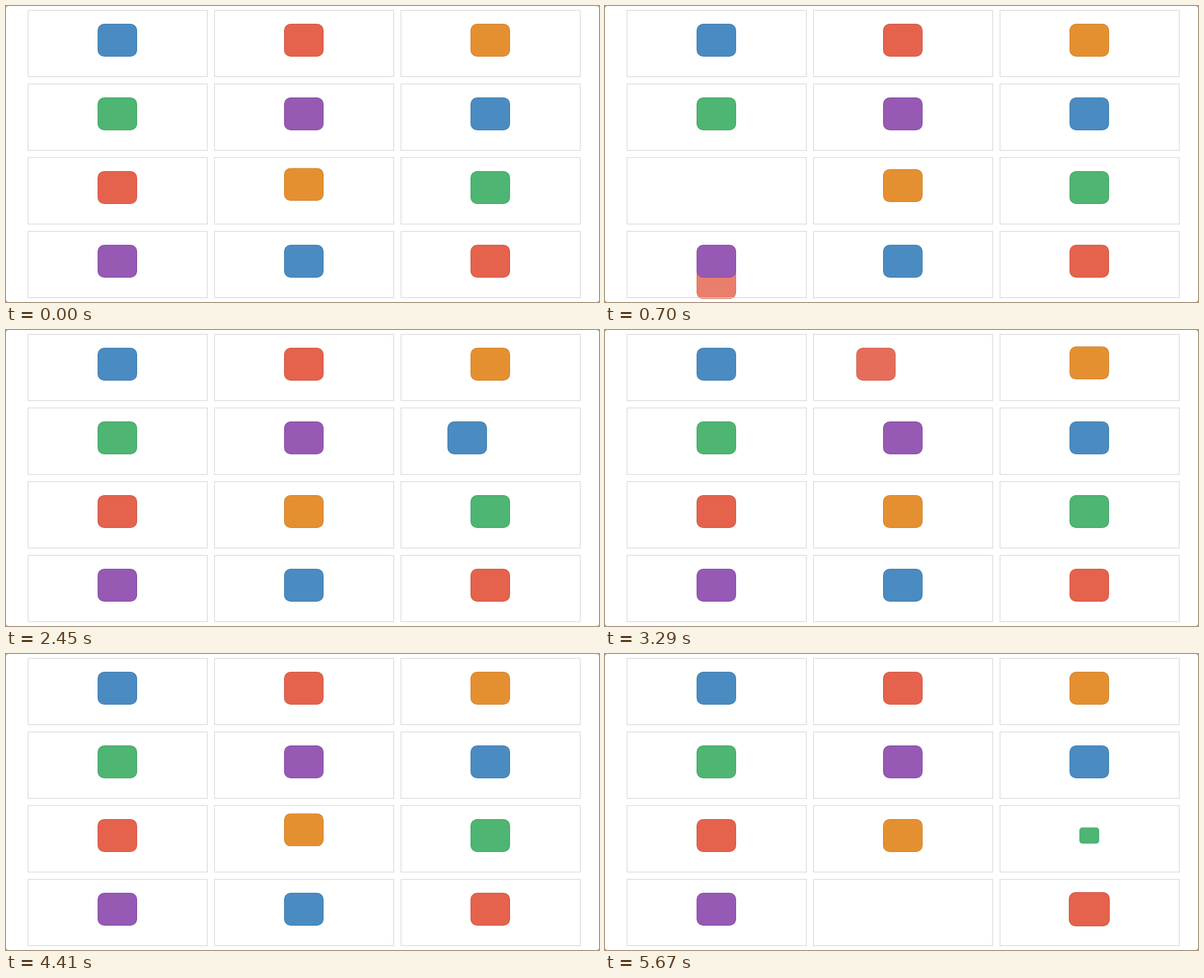
Animation of 900x450 px, one loop 5740 ms. Source, as an HTML page:

```html
<!DOCTYPE html>
<html lang="en">
<head>
<meta charset="utf-8">
<title>Box effects</title>
<style>
  html, body { margin: 0; width: 100%; height: 100%; overflow: hidden; background: #555; }
  #stage { position: relative; width: 900px; height: 450px; overflow: hidden; background: #fff; border-radius: 3px; }
  .cell, .box { position: absolute; box-sizing: border-box; }
  .cell { width: 273px; height: 102px; border: 1px solid #d6d6d6; }
  .box { width: 60px; height: 50px; border: 1px solid rgba(0, 0, 0, .1); border-radius: 10px; }
</style>
</head>
<body>
<div id="stage"></div>
<script>
const LOOP = 5740, STEP = 70;
const colors = ['#4a8bc1', '#e5624d', '#e59030', '#4eb572', '#9659b4'];
const stage = document.getElementById('stage');

function add(cls, left, top) {
  const el = document.createElement('div');
  el.className = cls;
  el.style.left = left + 'px';
  el.style.top = top + 'px';
  return stage.appendChild(el);
}

const boxes = Array.from({ length: 12 }, (_, i) => {
  const x = 33 + (i % 3) * 283, y = 6 + Math.floor(i / 3) * 112;
  add('cell', x, y);
  const box = add('box', x + 106, y + 21);
  box.style.background = colors[i % 5];
  return box;
});

const clamp = v => Math.min(1, Math.max(0, v));
const smooth = v => (v = clamp(v)) * v * (3 - 2 * v);

// Rise to 1, pause briefly, ease back to 0
function pulse(u) {
  return u < 427 ? smooth(u / 400) : clamp((940 - u) / 513) ** 2;
}

// Leave on one side, return from the other with a small overshoot
const fly = (dx, dy) => u => {
  const dist = Math.hypot(dx, dy);
  let k, o = 1;
  if (u < 400) {
    k = (u / 400) ** 2;
    o = 1 - k;
  } else if (u < 750) {
    const rest = (1 - (u - 400) / 350) ** 3;
    k = -rest;
    o = 1 - rest;
  } else {
    const v = (u - 750) / 60;
    k = 3 * v * Math.exp(1 - v) / dist;
  }
  return { x: dx * k, y: dy * k, o };
};

const nudge = (dx, dy) => u => ({ x: dx * pulse(u), y: dy * pulse(u) });
const grow = u => ({ s: 1 + .45 * pulse(u * 1.5) });
const shrink = u => ({ s: 1 - smooth(u / 400) });
const puff = u => {
  const k = clamp(u / 500);
  return { s: 1 + k, o: 1 - k };
};

// [box index, start ms, effect]
const cues = [
  [7, -92, nudge(0, -35)],
  [6, 530, fly(0, 800)],
  [4, 1217, fly(560, 0)],
  [5, 2040, nudge(-35, 0)],
  [2, 2470, nudge(0, -35)],
  [1, 3182, fly(-560, 0)],
  [7, 4280, nudge(0, -35)],
  [10, 4700, puff],
  [11, 5145, grow],
  [8, 5470, shrink]
];

function draw(t) {
  const poses = boxes.map(() => ({}));
  for (const [i, start, effect] of cues) {
    if (t >= start) poses[i] = effect(t - start);
  }
  poses.forEach(({ x = 0, y = 0, s = 1, o = 1 }, i) => {
    const { style } = boxes[i];
    style.transform = `translate(${x.toFixed(2)}px, ${y.toFixed(2)}px) scale(${s.toFixed(3)})`;
    style.opacity = o.toFixed(3);
  });
}

const begin = performance.now();
function tick() {
  const t = (performance.now() - begin) % LOOP;
  draw(Math.floor(t / STEP) * STEP);
  requestAnimationFrame(tick);
}
tick();
</script>
</body>
</html>
```
